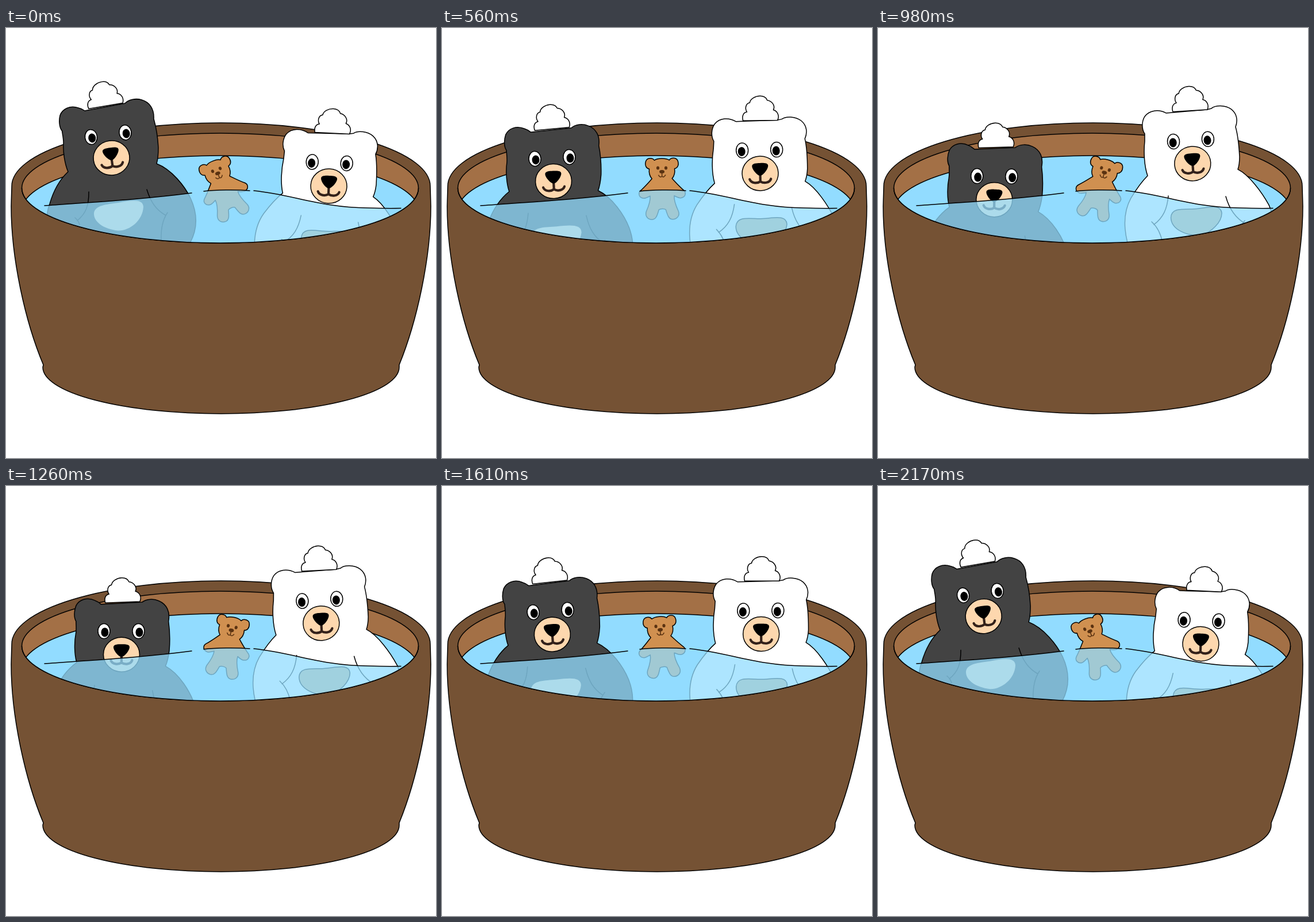
These frames come from a looping animation (748 px wide and 748 px high, 2240 ms). An HTML page with a canvas:

```html
<!DOCTYPE html>
<html lang="en">
<head>
<meta charset="utf-8">
<title>Bath time</title>
<style>
html, body { margin: 0; width: 100%; height: 100%; overflow: hidden; background: #fff; }
canvas { display: block; width: 748px; height: 748px; }
</style>
</head>
<body>
<canvas id="stage" width="748" height="748"></canvas>
<script>
const ctx = document.getElementById('stage').getContext('2d');
const LOOP = 2240, STEP = 70, HALF = 15;
const RAD = Math.PI / 180;
const WATER = '#92dcff', WOOD = '#755234', SKIN = '#fdd7ae', MOUTH = '#33211a';

const rim = { x: 372.5, y: 278.5, rx: 345, ry: 95.5 };
const DEPTH = 39; // the water lies this far below the rim

const tub = new Path2D(`M10 275 A364 110 0 0 1 738 275 L739 310
  C739 400 715 510 684 586 L684 590 A310 81 0 0 1 64 590 L65 586
  C33 510 9 400 9 310 Z`);

const hat = new Path2D(`M-30 0 C-32 -7 -30 -14 -23 -15 C-27 -21 -25 -30 -18 -31
  C-17 -38 -8 -42.5 0 -42.5 C7 -42.5 11 -39 12.5 -35 C20 -34 27 -26 23 -18
  C30 -16 34 -8 30 0 Z`);

const nose = new Path2D(`M-14 -13 C-14 -18 -6 -18 0 -18 C7 -18 14 -18 14 -13
  C14 -7 5 4 0 4 C-5 4 -14 -7 -14 -13 Z`);
const mouth = new Path2D('M-18.5 10 C-16 17 -6 18 0 14 C6 18 16 17 18.5 10 M0 3 L0 14');

const blackBear = {
  base: 0, pivot: [196, 330], shift: [4, 74], turn: 8.2,
  fur: '#434343', tummy: SKIN, pupil: 1.5,
  face: [183.5, 226, -7.5], hat: [173.5, 135.5, -9.8],
  body: new Path2D(`M92 430 C66 360 68 326 76 306 C82 285 92 265 108 250
    C102 236 99 215 100 200 C100 191 98 184 97.5 179 C92 172 92 160 94 152
    C98 141 111 134 126 139 C131 140 134 142 137 144 L207 131
    C214 124 226 122 236 125 C250 129 258 141 257 158
    C261 172 264 190 265 208 C265 220 264 229 262 236
    C288 246 311 275 321 296 C333 322 334 350 319 376 L296 430 Z`),
  belly: new Path2D(`M153 322 C155 308 175 307 195 304 C220 299 238 297 239 311
    C238 335 215 353 195 352.5 C170 350 152 337 153 322 Z`),
  arms: new Path2D(`M144 285 C144 308 140 322 124 335 M120 330 Q126 335 128 342
    M245 281 C252 304 262 317 278 326 M281 321 C272 334 269 350 270 376`)
};

const whiteBear = {
  base: 0.99, pivot: [550, 311], shift: [-6, -39.2], turn: -6.4,
  fur: '#fff', tummy: '#ccb080', pupil: -1,
  face: [547.3, 236, -4], hat: [543, 144, -3.5],
  body: new Path2D(`M455 430 C424 365 424 325 440 296 C449 281 458 268 469 257
    C463 240 462 215 464 197 L464 184 C458 175 459 162 464 154
    C472 143 488 141 501 148 L513 147 L572 142 L580 140
    C587 134 604 134 614 141 C625 149 626 162 622 172
    C626 186 628 206 629 224 C629 233 628 240 626 246
    C646 256 668 286 680 308 C696 343 690 385 670 430 Z`),
  belly: new Path2D(`M509.5 330 C510 314 526 315 546 315 C568 315 596 303 598 322
    C598 338 580 355 564 360 C538 364 510 350 509.5 330 Z`),
  arms: new Path2D(`M505 292 C503 315 496 330 480 342 M476 337 C486 346 492 357 495 374
    M605 293 C611 315 622 331 640 341 M638 335 C630 344 626 356 625 374`)
};

const teddy = new Path2D(`M0 -63 C6 -63 10 -62 13 -60 C16 -65 26 -65 28 -58
  C30 -51 27 -46 22 -45 C23 -38 21 -32 17.5 -28 C23 -22 30 -14 38 -7
  C42 -3 41 5 32 6 C28 6 25 4 21 2 C20 10 23 18 28 29 C31 38 24 43 18 43
  C11 43 9 36 6 26 C3 24 -3 24 -6 26 C-9 36 -11 43 -18 43
  C-24 43 -31 38 -28 29 C-23 18 -20 10 -21 2 C-25 4 -28 6 -32 6
  C-41 5 -42 -3 -38 -7 C-30 -14 -23 -22 -17.5 -28 C-21 -32 -23 -38 -22 -45
  C-27 -46 -30 -51 -28 -58 C-26 -65 -16 -65 -13 -60 C-10 -62 -6 -63 0 -63 Z`);
const teddyMouth = new Path2D('M-6 -34 Q-3 -29 0 -32 Q3 -29 6 -34 M0 -40 L0 -32');

const line1 = 'M67 309 C150 303 240 298 323 287';
const line2 = 'M344 284 C365 281.5 400 281 424 283';
const line3 = 'M431 283 C500 290 545 312 630 313 Q660 314 687 313.5';
const ripples = new Path2D(line1 + line2 + line3);
const surface = new Path2D('M0 309 L67 309' + line1.slice(7) + 'L344 284' + line2.slice(8) +
  'L431 283' + line3.slice(8) + 'L748 313 L748 400 L0 400 Z');

function ellipsePath(x, y, rx, ry, end = Math.PI * 2) {
  const p = new Path2D();
  p.ellipse(x, y, rx, ry, 0, 0, end);
  return p;
}

const inside = ellipsePath(rim.x, rim.y, rim.rx, rim.ry);
const pool = ellipsePath(rim.x, rim.y + DEPTH, rim.rx, rim.ry);
const lip = ellipsePath(rim.x, rim.y, rim.rx, rim.ry, Math.PI);

// Part of the stage that the front of the tub does not hide
const opening = new Path2D(lip);
opening.rect(0, 0, 748, rim.y);

function paint(path, fill, stroke = '#000', width = 1.5) {
  if (fill) {
    ctx.fillStyle = fill;
    ctx.fill(path);
  }
  if (stroke) {
    ctx.strokeStyle = stroke;
    ctx.lineWidth = width;
    ctx.stroke(path);
  }
}

function at(x, y, deg, draw) {
  ctx.save();
  ctx.translate(x, y);
  ctx.rotate(deg * RAD);
  draw();
  ctx.restore();
}

// Cubic ease-in-out with handles at .42 and .58
function ease(x) {
  let lo = 0, hi = 1, t = 0.5;
  for (let i = 0; i < 24; i++) {
    t = (lo + hi) / 2;
    const u = 1 - t;
    const v = 1.26 * t * u * u + 1.74 * t * t * u + t * t * t;
    if (v < x) lo = t; else hi = t;
  }
  return t * t * (3 - 2 * t);
}

function drawFace(pupil) {
  for (const x of [-30.5, 29.5]) {
    paint(ellipsePath(x, -40.7, 10.5, 13), '#fff');
    paint(ellipsePath(x + pupil, -38.7, 6.5, 8), '#000', null);
  }
  paint(ellipsePath(0, 0, 31.5, 30), SKIN);
  paint(mouth, null, MOUTH, 4.2);
  paint(nose, '#000', null);
}

function drawBear(bear, p) {
  const d = p - bear.base;
  const [x, y] = bear.pivot;
  at(x + bear.shift[0] * d, y + bear.shift[1] * d, bear.turn * d, () => {
    ctx.translate(-x, -y);
    paint(bear.body, bear.fur);
    paint(bear.belly, bear.tummy, bear === blackBear ? null : '#000');
    paint(bear.arms, null);
    at(...bear.face, () => drawFace(bear.pupil));
    at(...bear.hat, () => paint(hat, '#fff'));
  });
}

function drawTeddy(p) {
  at(383, 290, -21.5 + 37.5 * p, () => {
    paint(teddy, '#d09050');
    for (const x of [-7, 7]) paint(ellipsePath(x, -46.5, 2.6, 3), '#5a3211', null);
    paint(ellipsePath(0, -40, 4.5, 3), '#5a3211', null);
    paint(teddyMouth, null, '#5a3211', 1.6);
  });
}

function draw(time) {
  const step = Math.floor((time % LOOP) / STEP) % (HALF * 2);
  const p = ease(1 - Math.abs(1 - step / HALF));

  ctx.fillStyle = '#fff';
  ctx.fillRect(0, 0, 748, 748);
  ctx.lineCap = ctx.lineJoin = 'round';
  paint(tub, WOOD);
  paint(inside, '#a37046');

  ctx.save();
  ctx.clip(inside);
  paint(pool, WATER);
  ctx.restore();

  ctx.save();
  ctx.clip(opening);
  drawBear(blackBear, p);
  drawBear(whiteBear, p);
  drawTeddy(p);
  ctx.clip(inside);
  ctx.clip(pool);
  ctx.globalAlpha = 0.75;
  paint(surface, WATER, null);
  ctx.restore();

  paint(lip, null);
  paint(ripples, null);
}

const start = performance.now();
function tick() {
  draw(performance.now() - start);
  requestAnimationFrame(tick);
}
tick();
</script>
</body>
</html>
```
